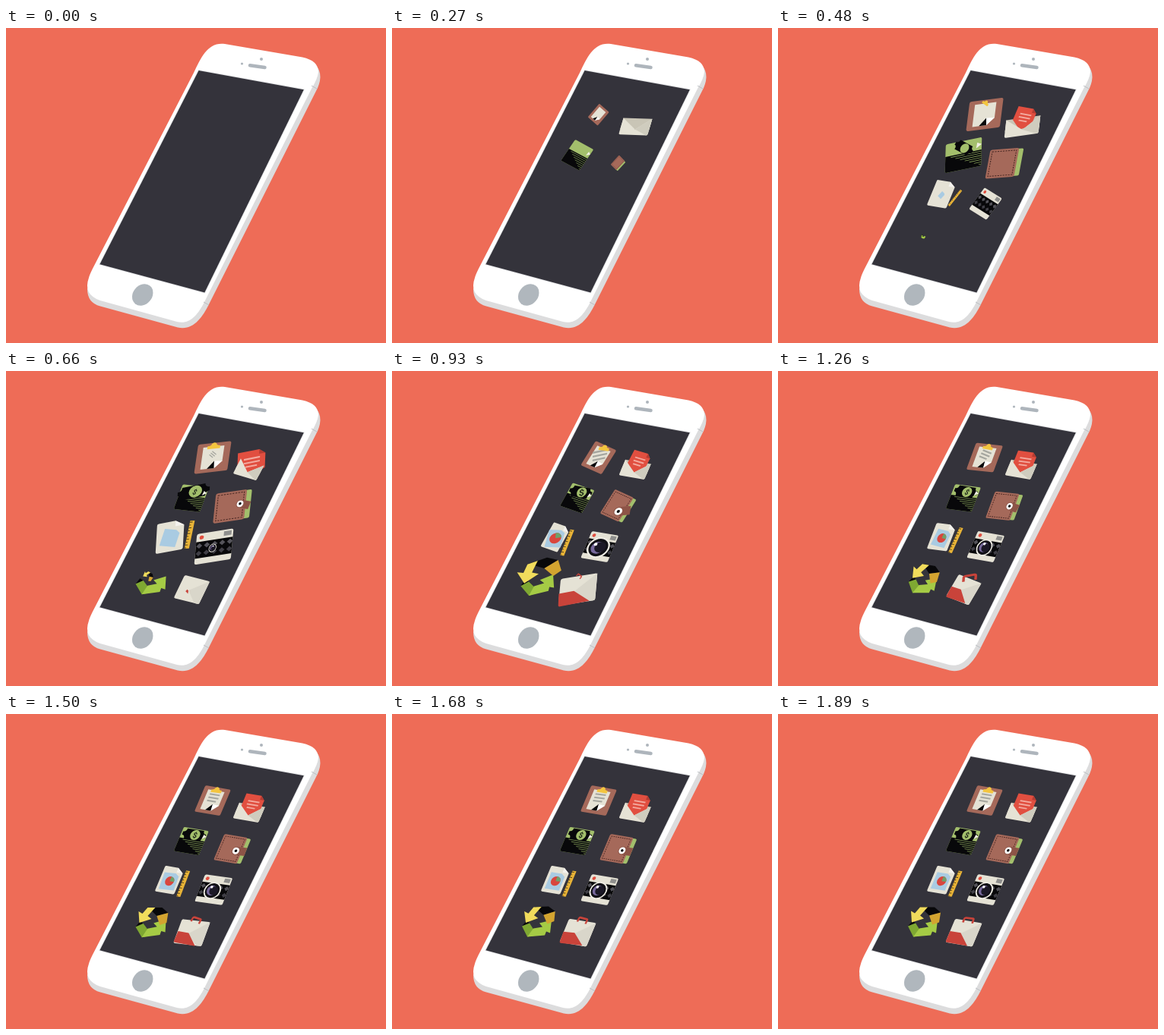
These frames come from a looping animation (500 px wide and 415 px high, 1920 ms). An HTML page:

```html
<!DOCTYPE html>
<html lang="en">
<head>
<meta charset="utf-8">
<title>Phone icons</title>
<style>
html, body { margin: 0; width: 100%; height: 100%; overflow: hidden; background: #ee6c57; }
svg { display: block; width: 100vw; height: 100vh; }
text { font: bold 11px Roboto, sans-serif; text-anchor: middle; }
</style>
</head>
<body>
<svg viewBox="0 0 500 415" xmlns="http://www.w3.org/2000/svg">
  <rect width="500" height="415" fill="#ee6c57"/>
  <path fill="#dcdcdd" d="M285 24 L390 42 Q414 46 413.500 65 Q413 74 408 83 L267 364 C258 382 246 399 226 394.500 L124 366.500 Q107 362 107 344 Z"/>
  <path fill="#fff" d="M288 21 L390 38.500 Q411 43 411 58 Q410 67 402 80 L261 361 C252 379 241 391 225 387 L124 359 Q101 351 109 329 Q110 325 114 317 L247 59 C257 38 266 18 288 21 Z"/>
  <path stroke="#bcbfc3" d="M402 76l7 4M260 361l7 4" fill="none"/>
  <path fill="#34333b" stroke="#dfe0e2" stroke-width="1.600" paint-order="stroke" d="M253.600 56L391.800 81.200L261.300 348.600L123.400 311.300Z"/>
  <path stroke="#aeb5bc" stroke-width="4.500" stroke-linecap="round" d="M321 49.200L340.500 52"/>
  <circle cx="336" cy="41" r="2" fill="#aeb5bc"/>
  <circle cx="310.500" cy="47" r="1.600" fill="#aeb5bc"/>
  <ellipse rx="15.300" ry="12.500" fill="#b0b7bd" transform="translate(179.700 351.500) rotate(-50)"/>
  <g id="icons"></g>
</svg>
<script>
const LOOP = 1920, STEP = 30;

const shape = (fill, d) => `<path fill="${fill}" d="${d}"/>`;
const line = (color, width, d, extra = '') =>
  `<path fill="none" stroke="${color}" stroke-width="${width}" d="${d}" ${extra}/>`;
const dot = (fill, x, y, r) => `<circle cx="${x}" cy="${y}" r="${r}" fill="${fill}"/>`;
const box = (fill, x, y, w, h, r = 0) =>
  `<rect x="${x}" y="${y}" width="${w}" height="${h}" rx="${r}" fill="${fill}"/>`;
// A part pivots on (x, y) and repeats the swing of its icon after a delay.
const part = (x, y, delay, art) => `<g data-part="${x},${y},${delay}">${art}</g>`;
// Art given in stage directions instead of the tilted plane.
const upright = art => `<g transform="matrix(1.138 -.185 .476 1.085 0 0)">${art}</g>`;
const repeat = (n, make) => Array.from({ length: n }, (_, i) => make(i)).join('');

const cream = '#e5e2d5', brown = '#a5695a', red = '#e14f40', black = '#08080a';
const green = '#a3bf6c';

const clipboard =
  box(brown, -20, -20, 41, 40, 2.5) +
  shape(cream, 'M-13-15H13V6L4 15H-13Z') +
  shape(black, 'M-5 15L3 5L4 15Z') + shape('#fff', 'M4 15L3 5L13 6Z') +
  part(0, -4, 390, line('#a5a69f', 2.3, 'M-8-9H8M-8-4H8M-8 1H6')) +
  part(0, -16, 190, shape('#f3c53f', 'M-8-12V-16Q-3-16-3-19Q0-22 3-19Q3-16 8-16V-12Z'));

const letter =
  shape('#c9c5b6', 'M-19-6H22V10H-19Z') +
  part(3, -4, 270,
    shape(red, 'M-14-21H10L17-15V4L2 12L-14 0Z') + shape('#b43c32', 'M10-21V-15H17Z') +
    line('#f3aba0', 2, 'M-7-11H11M-7-6H11M-5-1H8')) +
  shape(cream, 'M-19-6L2 10L22-6V16Q22 18 20 18H-17Q-19 18-19 16Z') +
  shape('#cfccbe', 'M2 10L22-6V16Q22 18 20 18Z');

const money =
  box(green, -20, -18, 40, 37, 2) +
  shape(black, 'M-20-2H20V17Q20 19 18 19H-18Q-20 19-20 17Z') +
  repeat(7, i => line('#86a05a', .8, `M${-14 + i * 5.2} ${i * 2.8}H20`)) +
  part(0, -9, 210,
    shape(black, 'M-18-12Q-13-12-13-17H13Q13-12 18-12V-7Q13-7 13-1H-13Q-13-7-18-7Z') +
    dot(green, 2, -9, 7.5)) +
  part(2, -9, 370, `<text x="2" y="-5" fill="#20291a">$</text>`) +
  shape('#f1f0e4', 'M15-12L20-9L14-5Z');

const wallet =
  box(green, 8, -19, 14, 38, 2) + box(brown, -21, -20, 37, 40, 2.5) +
  line('#43231f', 1, 'M-18-17H13V17H-18Z', 'stroke-dasharray="2 1.400"') +
  part(17, 1, 250,
    shape('#8d5447', 'M22-5H7A6 6 0 0 0 7 7H22Z') +
    dot('#fff', 7, 1, 5) + dot(black, 7, 1, 2));

const chart =
  shape(cream, 'M-12-20H7L17-13V17Q17 19 15 19H-12Q-14 19-14 17V-18Q-14-20-12-20Z') +
  part(2, 1, 150, shape('#a9cbe2', 'M-10-11H7L13-7V14H-10Z')) +
  shape('#f4f2ee', 'M7-20V-13H17Z') +
  part(2, 1, 360, dot('#d9463d', 2, 1, 7) + shape('#6fa06a', 'M2 1V-6A7 7 0 0 1 9 1Z')) +
  part(23, 2, 120, box('#e9b437', 21, -18, 6, 39) +
    repeat(10, i => line('#4b3a18', 1, `M21 ${-16 + i * 4}h${i % 2 ? 2 : 3.5}`)));

const diamond = (fill, x, y) => shape(fill, `M${x} ${y}l3.5 3.5-3.5 3.5-3.5-3.5z`);
const camera =
  box(cream, -21, -20, 43, 41, 2.5) + box(black, -21, -9, 43, 22) +
  repeat(5, i => diamond('#55545b', -17 + i * 9, -7) + diamond('#403f46', -17 + i * 9, 3)) +
  dot(red, -15, -14.5, 2.6) + box('#8f8f8d', 11, -18, 9, 6) +
  part(-1, 2, 230,
    dot('#efede4', -1, 2, 13) + dot('#111016', -1, 2, 11) + dot('#77699c', -2, 2, 7.5) +
    dot('#1b1826', 1, 2, 6.5) + dot('#fff', -4, -3, 2));

const recycle =
  upright(
    shape(black, 'M-21 6L-15-1L-11 2Z') +
    shape('#7fa832', 'M-21 6L-11 2L-1 18L-14 20Z') +
    shape('#a5cb45', 'M-14 20L-6 9L6 7L2 2L18-2L16 15L11 13L9 18Z')) +
  part(-11, -3, 165, upright(
    shape(black, 'M-4-19H14L22-12L7-8L0-15Z') +
    shape('#d3a430', 'M7-8L22-12L20 1L11 4Z') +
    shape('#f1dc5c', 'M-5-19H5L-5-8L0-4L-16 1L-17-14L-12-11Z')));

const bag =
  box(cream, -21, -18, 43, 36, 2.5) +
  shape('#d9d6ca', 'M22-18L-4 2L14 18H20Q22 18 22 16Z') +
  part(-4, 3, 125, shape('#c9433a', 'M-21 1H-4L14 18H-19Q-21 18-21 16Z')) +
  part(0, -17, 365, line('#c9433a', 3, 'M-7-15V-20Q-7-22-5-22H5Q7-22 7-20V-15'));

// art, centre, start time
const icons = [
  [clipboard, 271.5, 114, 230], [letter, 320.5, 124.5, 60],
  [money, 244, 167, 170], [wallet, 297.5, 178, 245],
  [chart, 214, 219, 310], [camera, 273, 231, 400],
  [recycle, 192, 273.5, 470], [bag, 244, 288, 525]
];

// Resting pose lies in the screen; the swung pose faces the viewer.
const rest = [.82, .14, -.36, .86], swung = [1.19, -.25, -.03, 1.02];
const swing = [[0, -1], [80, -.6], [160, 0], [300, 1], [390, .85], [520, 0],
  [680, -.42], [880, 0], [1000, .12], [1200, 0]];

const easeOut = v => 1 - (1 - Math.min(1, v)) ** 3;

function swingAt(age) {
  const next = swing.findIndex(key => key[0] > age);
  if (next < 0) return 0;
  const [t0, a] = swing[next - 1], [t1, b] = swing[next];
  return a + (b - a) * (1 - Math.cos(Math.PI * (age - t0) / (t1 - t0))) / 2;
}

function poseAt(age) {
  const size = easeOut(age / 150), p = swingAt(age);
  return new DOMMatrix([...rest.map((v, i) => size * (v + p * (swung[i] - v))), 0, 0]);
}

// Shows an element once it has started and sets its matrix.
function place(el, age, makeMatrix) {
  el.style.display = age > 0 ? '' : 'none';
  if (age > 0) el.setAttribute('transform', makeMatrix().toString());
}

const layer = document.getElementById('icons');
layer.innerHTML = icons.map(([art]) => `<g>${art}</g>`).join('');
const nodes = [...layer.children].map((el, i) => ({
  el, x: icons[i][1], y: icons[i][2], start: icons[i][3],
  parts: [...el.querySelectorAll('[data-part]')].map(g => ({ g, spec: g.dataset.part.split(',').map(Number) }))
}));

function draw(time) {
  for (const { el, x, y, start, parts } of nodes) {
    const age = time - start;
    place(el, age, () => new DOMMatrix().translate(x, y).multiply(poseAt(age)));
    for (const { g, spec: [px, py, delay] } of parts) {
      place(g, age - delay, () => new DOMMatrix().translate(px, py)
        .multiply(poseAt(age).inverse()).multiply(poseAt(age - delay)).translate(-px, -py));
    }
  }
}

const begin = performance.now();
function tick() {
  const time = (performance.now() - begin) % LOOP;
  draw(Math.floor(time / STEP) * STEP);
  requestAnimationFrame(tick);
}
tick();
</script>
</body>
</html>
```
